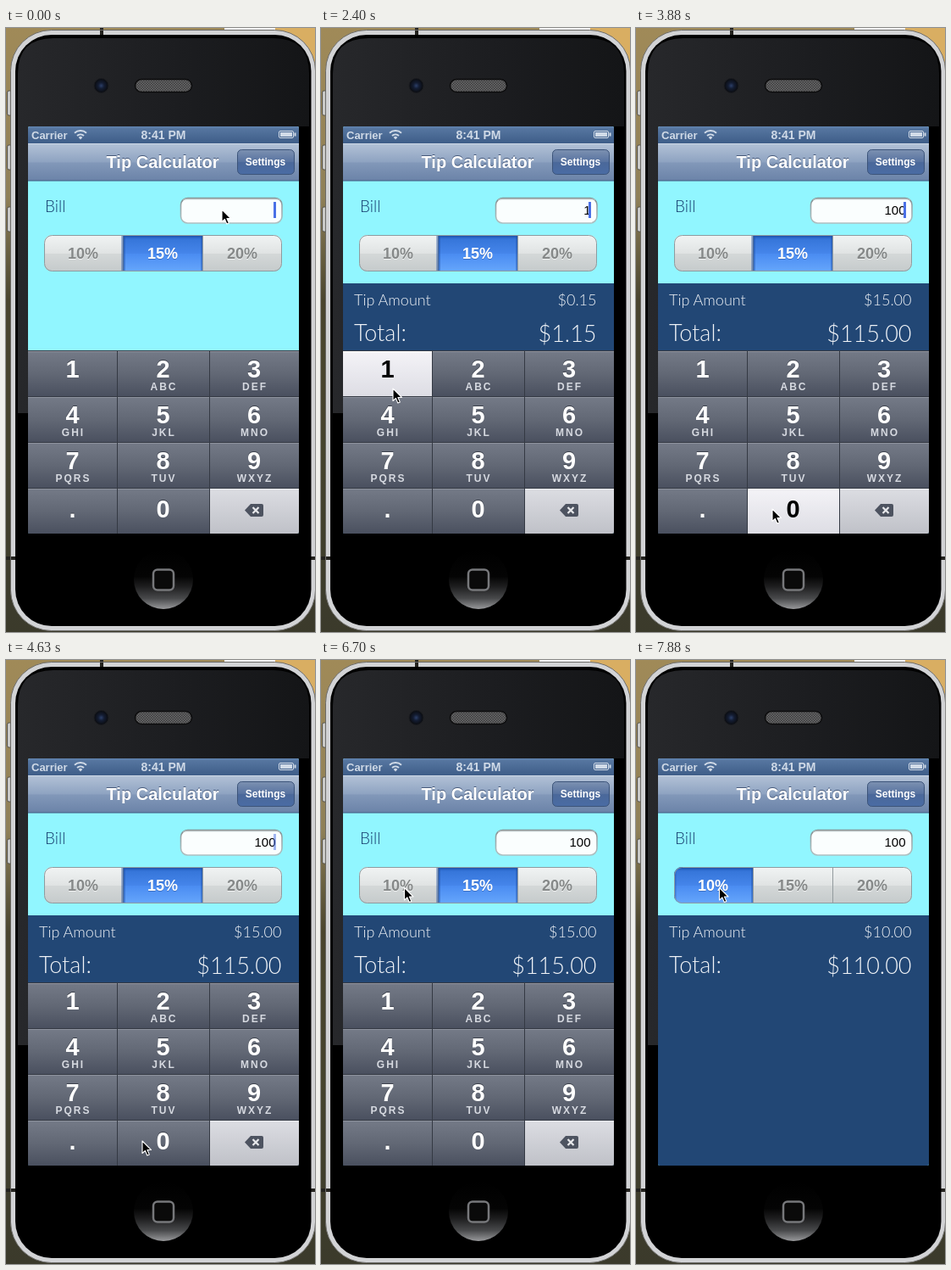
Recreate the animation shown at these times as an HTML page. Size 365 by 712 pixels, loop 8000 ms.

```html
<!DOCTYPE html>
<html lang="en">
<head>
<meta charset="utf-8">
<title>Tip Calculator</title>
<style>
html, body { margin: 0; width: 100%; height: 100%; overflow: hidden; background: #000; }
svg { display: block; width: 365px; height: 712px; }
text { font-family: "Liberation Sans", Arial, sans-serif; }
.b { font-weight: 700; }
.m { text-anchor: middle; }
.e { text-anchor: end; }
.hand { font-family: Lato, sans-serif; font-weight: 300; }
</style>
</head>
<body>
<svg viewBox="0 0 365 712" xmlns="http://www.w3.org/2000/svg">
  <defs id="defs">
    <clipPath id="screen"><rect x="26" y="116" width="320" height="480" rx="2"/></clipPath>
    <clipPath id="seg"><rect x="45" y="244" width="281" height="43" rx="9"/></clipPath>
    <pattern id="mesh" width="3" height="3" patternUnits="userSpaceOnUse">
      <rect width="3" height="3" fill="#3a3a3b"/>
      <path d="M0 0h1.5v1.5H0zM1.5 1.5H3V3H1.5z" fill="#6c6c6d"/>
    </pattern>
    <radialGradient id="lens"><stop offset="0" stop-color="#2c3f68"/><stop offset=".4" stop-color="#141d33"/><stop offset="1" stop-color="#0a0b0e"/></radialGradient>
    <linearGradient id="sheen"><stop offset="0" stop-color="#27282b"/><stop offset=".55" stop-color="#1c1d20"/><stop offset="1" stop-color="#141517"/></linearGradient>
  </defs>

  <!-- desk and phone body -->
  <rect width="365" height="712" fill="url(#desk)"/>
  <path d="M315 0h50v60z" fill="#d9ae62"/>
  <path d="M258 0h60v2h-60z" fill="#f4f4f6"/>
  <path d="M111 0h4v8h-4zM0 623h10v4H0zM358 623h7v4h-7z" fill="#24231f"/>
  <g fill="#c9c9c7" stroke="#55524a">
    <rect x="1.5" y="74" width="8" height="29" rx="2"/>
    <rect x="1.5" y="138" width="8" height="29" rx="2"/>
    <rect x="1.5" y="211" width="8" height="29" rx="2"/>
  </g>
  <rect x="5.5" y="2.5" width="360" height="708" rx="48" fill="#d2d3d5" stroke="#6c6b68"/>
  <path d="M111 3h4v6h-4zM6 623h5v4H6zM360 623h5v4h-5z" fill="#24231f"/>
  <rect x="11" y="8" width="349.500" height="697" rx="43" fill="#000"/>
  <path d="M14 454V54Q14 12 56 12H316Q358 12 358 54V116H346V454Z" fill="url(#sheen)"/>
  <circle cx="112.500" cy="68" r="8.500" fill="url(#lens)" stroke="#1b1c20"/>
  <rect x="152.500" y="60.500" width="67" height="15" rx="7.500" fill="url(#mesh)" stroke="#0c0c0d" stroke-width="1.500"/>
  <circle cx="186" cy="650" r="35" fill="url(#home)"/>
  <rect x="174" y="638.500" width="24" height="24" rx="5" fill="#0a0a0a" stroke="#77787b" stroke-width="2.500"/>

  <g clip-path="url(#screen)">
    <rect x="26" y="116" width="320" height="480" fill="#91f6ff"/>
    <!-- status bar -->
    <rect x="26" y="116" width="320" height="20" fill="url(#status)"/>
    <g fill="#d0dae7">
      <text class="b" x="30" y="130.500" font-size="13">Carrier</text>
      <text class="b m" x="186" y="130.500" font-size="14">8:41 PM</text>
      <path d="M88 131.500l-2.300-2.600a3.400 3.400 0 0 1 4.600 0z"/>
      <path d="M84 127a6 6 0 0 1 8 0M81 123.800a10.300 10.300 0 0 1 14 0" fill="none" stroke="#d0dae7" stroke-width="1.900"/>
      <rect x="322.500" y="121.500" width="17" height="8" rx="1.500" fill="none" stroke="#d0dae7"/>
      <path d="M324 123h14v5h-14zM340.500 123.500h2v4h-2z"/>
    </g>
    <!-- navigation bar -->
    <rect x="26" y="136" width="320" height="44" fill="url(#nav)"/>
    <path d="M26 136.500h320" stroke="#cdd8e6"/>
    <path d="M26 180h320" stroke="#3e5a80"/>
    <g class="b m" font-size="20">
      <text x="185" y="164" fill="#46597a">Tip Calculator</text>
      <text x="185" y="165" fill="#fff">Tip Calculator</text>
    </g>
    <rect x="273.500" y="143.500" width="67" height="29" rx="5" fill="url(#btn)" stroke="#3b5379"/>
    <text class="b m" x="306.500" y="162" font-size="12" fill="#fff">Settings</text>
    <!-- bill form -->
    <text class="hand" x="46" y="217" font-size="19" fill="#173f70">Bill</text>
    <rect x="206.500" y="200.500" width="119.500" height="29.500" rx="8" fill="#fafefe" stroke="url(#rim)" stroke-width="1.600"/>
    <path d="M209 203q2-1.500 5-1.500h104q4 0 6 1.500" fill="none" stroke="#b5bfc0" stroke-width="1.500"/>
    <text class="e" id="bill" x="318.500" y="220" font-size="15"/>
    <rect id="caret" x="316" y="205" width="3" height="19" fill="#4a70e6"/>
    <g id="tips" clip-path="url(#seg)"></g>
    <rect x="45.500" y="244.500" width="280" height="42" rx="9" fill="none" stroke="#8d9b9f"/>
    <!-- totals -->
    <g id="totals" fill="#f1f4f8">
      <rect x="26" y="301" width="320" height="295" fill="#224775"/>
      <text class="hand" x="39" y="327" font-size="18">Tip Amount</text>
      <text class="hand" x="39" y="369" font-size="27">Total:</text>
      <text class="hand e" id="tip" x="325.500" y="327" font-size="18"/>
      <text class="hand e" id="total" x="325.500" y="370" font-size="27"/>
    </g>
    <g id="pad"></g>
  </g>
  <path id="arrow" d="M0 0V14.500L3.400 11.400 5.800 17 8.300 15.900 5.900 10.500H10.500Z" fill="#000" stroke="#fff" stroke-width="1.100" stroke-linejoin="round"/>
</svg>
<script>
const $ = id => document.getElementById(id);

function add(parent, tag, attrs, text) {
  const el = document.createElementNS("http://www.w3.org/2000/svg", tag);
  for (const k in attrs) el.setAttribute(k, attrs[k]);
  if (text) el.textContent = text;
  parent.appendChild(el);
  return el;
}

// vertical gradient from "offset colour" stops
function gradient(id, ...stops) {
  const g = add($("defs"), "linearGradient", { id, x2: 0, y2: 1 });
  for (const s of stops) {
    const [offset, color] = s.split(" ");
    add(g, "stop", { offset, "stop-color": color });
  }
}
gradient("desk", "0 #a08a58", ".28 #8f8058", ".45 #4a452e", ".7 #45432e", "1 #3b3a2b");
gradient("home", "0 #000", ".45 #040404", ".62 #1e1e1f", ".82 #48494b", "1 #98999b");
gradient("status", "0 #6285b1", ".15 #55759f", "1 #3e5d88");
gradient("nav", "0 #b3c2d7", ".5 #8ea3c1", ".52 #8298b9", "1 #6b83a8");
gradient("btn", "0 #7c91b1", ".5 #5772a0", ".52 #4a689a", "1 #4a6ca4");
gradient("rim", "0 #7f898b", ".3 #98a5a7", "1 #aebfc1");
gradient("off", "0 #f1f4f4", ".5 #e0e3e3", ".52 #d4d8d8", "1 #c5cacb");
gradient("on", "0 #1e56b4", ".12 #3676da", ".5 #4585ea", ".52 #4a8cf1", "1 #66a6fc");
gradient("key", "0 #747a87", ".5 #626875", "1 #4a505f");
gradient("lit", "0 #f4f3f7", "1 #dddde4");
gradient("del", "0 #dcdde2", "1 #bfc1c8");

// tip segments
const edges = [45, 138.5, 232.5, 326];
const segments = [10, 15, 20].map((pct, i) => {
  const x = edges[i], width = edges[i + 1] - x;
  const box = add($("tips"), "rect", { x, y: 244, width, height: 43 });
  const label = { class: "b m", x: [91, 185, 279][i], "font-size": 18 };
  const under = add($("tips"), "text", { ...label, y: 273 }, pct + "%");
  const over = add($("tips"), "text", { ...label, y: 272 }, pct + "%");
  if (i) add($("tips"), "path", { d: `M${x} 244v43`, stroke: "#929a9d" });
  const inset = add($("tips"), "g", { fill: "none", stroke: "#174796", "stroke-opacity": .35 });
  for (const w of [2, 5]) add(inset, "path", { d: `M${x} 287v-43h${width}v43`, "stroke-width": w });
  return on => {
    box.setAttribute("fill", on ? "url(#on)" : "url(#off)");
    under.setAttribute("fill", on ? "#3a6fc4" : "#f3f5f5");
    over.setAttribute("fill", on ? "#fff" : "#858888");
    inset.setAttribute("opacity", on ? 1 : 0);
  };
});

// number pad
const pad = $("pad"), cols = [26, 132, 241, 347], keys = {};
const letters = " ,ABC,DEF,GHI,JKL,MNO,PQRS,TUV,WXYZ".split(",");
add(pad, "rect", { x: 26, y: 380, width: 320, height: 216, fill: "#343943" });
[..."123456789.0<"].forEach((name, i) => {
  const c = i % 3, row = Math.floor(i / 3), y = 381 + row * 54;
  const x = cols[c], width = cols[c + 1] - x - 1, mid = [78.5, 185.5, 293][c];
  const box = add(pad, "rect", { x, y, width, height: 53 });
  const shine = add(pad, "path", { d: `M${x} ${y + .5}h${width}`, stroke: "#8d929d" });
  if (name === "<") {
    box.setAttribute("fill", "url(#del)");
    shine.setAttribute("stroke", "#eceef1");
    add(pad, "path", { d: "M282 568.500l7-7.500h13q2 0 2 2v11q0 2-2 2h-13z", fill: "#4d5360" });
    add(pad, "path", { d: "M291.500 565l7 7m0-7l-7 7", stroke: "#e8e9ec", "stroke-width": 2.2 });
    return;
  }
  const base = y + (row === 3 ? 34 : 31);
  const face = { class: "b m", x: mid, "font-size": 29 };
  const shade = add(pad, "text", { ...face, y: base - 1, fill: "#3b404b" }, name);
  const digit = add(pad, "text", { ...face, y: base }, name);
  const sub = add(pad, "text", { class: "b m", x: mid + 1, y: y + 46, "font-size": 12, "letter-spacing": 2 }, letters[i]);
  keys[name] = lit => {
    box.setAttribute("fill", lit ? "url(#lit)" : "url(#key)");
    shine.setAttribute("stroke", lit ? "#fff" : "#8d929d");
    shade.setAttribute("opacity", lit ? 0 : 1);
    digit.setAttribute("fill", lit ? "#000" : "#fff");
    sub.setAttribute("fill", lit ? "#000" : "#d6d9e0");
  };
});

// [time, value...] lists: each value holds until the next time
const pointer = [
  [0, 255, 214], [1800, 120, 437], [1950, 96, 428], [2100, 88, 426], [2250, 85, 425],
  [2540, 93, 441], [2690, 118, 482], [2840, 148, 520], [2980, 157, 552], [3130, 160, 565],
  [3280, 161, 567], [5080, 165, 548], [5230, 190, 445], [5370, 220, 290], [5520, 232, 198],
  [5670, 197, 218], [5820, 132, 254], [5960, 91, 270], [6110, 98, 269], [6250, 98.500, 268.500]
];
const bills = [[0, ""], [2400, "1"], [3430, "10"], [3880, "100"]];
const presses = [[0, ""], [2400, "1"], [2540, ""], [3430, "0"], [3580, ""], [3880, "0"], [4030, ""]];
const slides = [[0, 0], [7740, 110], [7880, 216]];
// caret fades start here, alternately out and in, two steps each
const fades = [300, 750, 1200, 1800, 2980, 3280, 4630, 5080, 5670, 5960, 6550, 6990, 7440];

const at = (list, t) => list.reduce((held, item) => item[0] <= t ? item : held).slice(1);

function caretAlpha(t) {
  let n = -1;
  while (fades[n + 1] <= t) n++;
  if (n < 0) return 1;
  return t - fades[n] < 140 ? .5 : n % 2;
}

const money = v => "$" + v.toFixed(2);

function draw(t) {
  const [x, y] = at(pointer, t), [bill] = at(bills, t), [pressed] = at(presses, t);
  const pick = t < 7590 ? 1 : 0, tip = bill * [.10, .15, .20][pick];
  $("arrow").setAttribute("transform", `translate(${x} ${y})`);
  $("bill").textContent = bill;
  $("caret").setAttribute("opacity", pick ? caretAlpha(t) : 0);
  $("totals").setAttribute("visibility", bill ? "visible" : "hidden");
  $("tip").textContent = money(tip);
  $("total").textContent = money(+bill + tip);
  segments.forEach((set, i) => set(i === pick));
  for (const k in keys) keys[k](k === pressed);
  pad.setAttribute("transform", `translate(0 ${at(slides, t)[0]})`);
}

const start = performance.now();
function tick() {
  draw((performance.now() - start) % 8000);
  requestAnimationFrame(tick);
}
tick();
</script>
</body>
</html>
```
